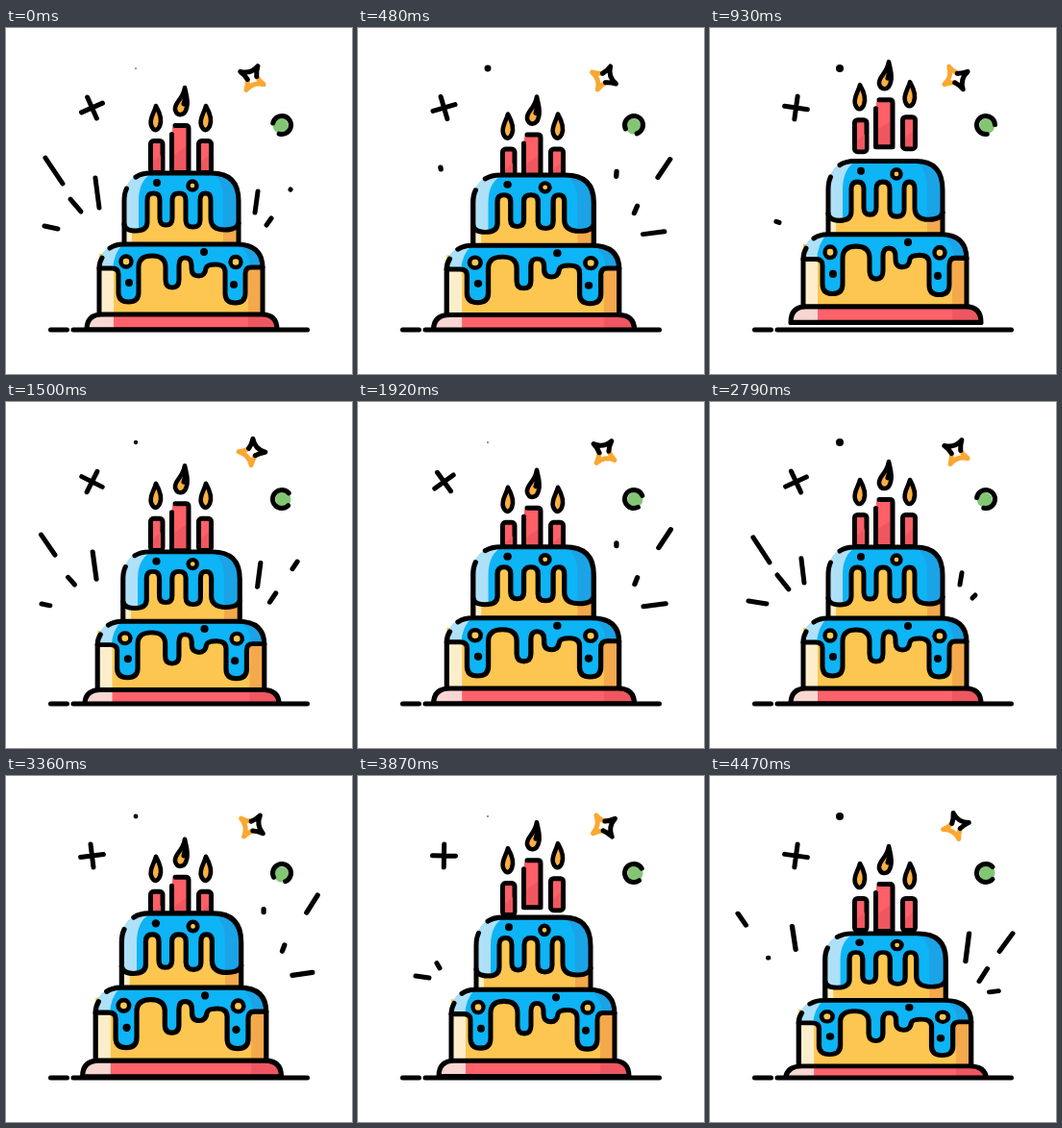
Animation, 360 px wide and 360 px high, one loop 4.5 s. Source, as an HTML page without scripts:

```html
<!DOCTYPE html>
<html lang="en">
<head>
<meta charset="utf-8">
<title>Bouncing birthday cake</title>
<style>
  html, body { margin: 0; width: 100%; height: 100%; overflow: hidden; background: #fff; }
  svg { display: block; width: 100vw; height: 100vh; }
  .line { fill: none; stroke: #000; stroke-width: 5; stroke-linecap: round; stroke-linejoin: round; }
  .candle { fill: #ff5f66; stroke: #000; stroke-width: 5; }
  .flame { fill: #fbb040; stroke: #000; stroke-width: 4.6; stroke-linejoin: round; }
  .bead { fill: #fdc94f; stroke: #000; stroke-width: 4.4; }
  .amber { stroke: #f9a832; }
  .icing { fill: #0db4f6; }
  .sponge { fill: #fdc650; }
  .cream { fill: #fdeecb; }
  .shade { fill: #f3a94c; }
  .glow { fill: #aee0f8; }
  .deep { fill: #1aa3e6; }
</style>
</head>
<body>
<svg viewBox="0 0 360 360">
  <defs>
    <clipPath id="aboveGround"><path d="M0 0H360V314H0Z"/></clipPath>
    <path id="topIcing" d="M123 204V180Q123 151 150 151H214Q242 151 242 180V203Q240 210 228 210 213 210 213 198V179Q213 172 207.500 172 202 172 202 179V200Q202 207 194.500 207 187 207 187 200V179Q187 172 180 172 173 172 173 179V198Q173 205 166.500 205 160 205 160 198V179Q160 172 153.500 172 147 172 147 179V202Q147 211 135 211 124 211 123 204Z"/>
    <path id="lowIcing" d="M97 250Q97 225 122 225H240Q267 225 267 249H255Q249 249 249 256V276Q249 286 238.500 286 228 286 228 276V254Q228 246 218 246 209 246 208 250 207 258 200.500 258 193 258 193 250V247Q193 239 186 239 180 239 180 247V262Q180 270 173 270 166 270 166 262V249Q166 237 152 237 138 237 138 249V275Q138 285 127.500 285 117 285 117 275V256Q117 250 110 250Z"/>
    <path id="base" d="M84 314Q84 298 100 298H266Q282 298 282 314Z"/>
    <path id="flame" d="M156 81C160 88 163 95 160 102 157 108 153 107 151 101 149 94 154 89 156 81Z"/>
    <clipPath id="inTop"><use href="#topIcing"/></clipPath>
    <clipPath id="inLow"><use href="#lowIcing"/></clipPath>
    <clipPath id="inBase"><use href="#base"/></clipPath>
  </defs>

  <!-- master clock: every part restarts with it -->
  <rect width="360" height="360" fill="#fff">
    <animate id="loop" attributeName="visibility" values="visible" begin="0s;loop.end" dur="4.5s"/>
  </rect>

  <!-- floating ornaments -->
  <g transform="translate(89.500 83)"><path class="line" d="M-12 0H12M0-12V12">
    <animateTransform attributeName="transform" type="rotate" values="-24;83;98;91;8;-36;-36;-24" keyTimes="0;.186;.328;.366;.577;.678;.8;1" begin="0s;loop.end" dur="2.834s" repeatCount="indefinite"/>
  </path></g>

  <g transform="translate(256 52)"><g>
    <path class="line amber" d="M-5 0Q-6 5-9.500 10 0 4 9.500 10 6 5 5 0"/>
    <path class="line" d="M-5 0Q-6-5-9.500-10 0-4 9.500-10 6-5 5 0"/>
    <animateTransform attributeName="transform" type="rotate" values="-18;81;105;100;32;-9;-20;-18" keyTimes="0;.186;.328;.366;.577;.678;.85;1" begin="0s;loop.end" dur="2.834s" repeatCount="indefinite"/>
  </g></g>

  <g transform="translate(287 101)"><g>
    <circle cx="1.500" r="8" fill="#82c674"/>
    <path class="line" d="M7-6.400A9.500 9.500 0 1 0 7 6.400"/>
    <animateTransform attributeName="transform" type="rotate" values="150;110;40;12;0;20;146;150" keyTimes="0;.186;.328;.366;.577;.678;.985;1" begin="0s;loop.end" dur="2.834s" repeatCount="indefinite"/>
  </g></g>

  <circle cx="135" cy="42" r=".7">
    <animate attributeName="r" values=".7;4;4;.7" keyTimes="0;.3;.5;1" begin="0s;loop.end" dur="1.93s" repeatCount="indefinite"/>
  </circle>

  <!-- candles -->
  <g>
    <rect class="candle" x="150.500" y="117.500" width="12.500" height="33" rx="3"/>
    <path d="M153 139l8-7v16h-8z" fill="#f0565f"/>
    <use href="#flame" class="flame"/>
    <animateTransform attributeName="transform" type="translate" values="0 0;0 10;0 12;0 8;0 3;0 -26;0 -22;0 -6;0 0;0 0" keyTimes="0;.155;.24;.355;.371;.54;.656;.731;.775;1" begin="0s;loop.end" dur="1.417s" repeatCount="indefinite"/>
  </g>
  <g>
    <rect class="candle" x="200.500" y="117.500" width="13" height="33" rx="3"/>
    <path d="M203 139l8-7v16h-8z" fill="#f0565f"/>
    <use href="#flame" class="flame" x="52"/>
    <animateTransform attributeName="transform" type="translate" values="0 0;0 10;0 12;0 8;0 3;0 -29;0 -25;0 -11;0 0;0 0" keyTimes="0;.155;.24;.355;.371;.54;.656;.731;.79;1" begin="0s;loop.end" dur="1.417s" repeatCount="indefinite"/>
  </g>
  <g>
    <rect x="173" y="101.500" width="17" height="49" rx="3" fill="#ff5f66"/>
    <path d="M175 132l13-9v26h-13z" fill="#f0565f"/>
    <path class="line" d="M176 101.500H187Q190 101.500 190 104.500V150.500H172.500V110.500"/>
    <path class="flame" d="M186 62C188 72 190 76 188 83 186 92 178 92 176 85 175 77 184 75 186 62Z"/>
    <path class="line" d="M186 68Q187 74 185 79"/>
    <animateTransform attributeName="transform" type="translate" values="0 0;0 11;0 13;0 9;0 4;0 -32;0 -27;0 -14;0 0;0 0" keyTimes="0;.155;.24;.355;.371;.54;.656;.731;.8;1" begin="0s;loop.end" dur="1.417s" repeatCount="indefinite"/>
  </g>

  <!-- cake and rays, squashed and stretched from the ground -->
  <g clip-path="url(#aboveGround)"><g transform="translate(182 314)"><g>
    <animateTransform attributeName="transform" type="translate" values="0 0;0 3;0 3;0 0;0 -1;0 -13;0 -7.7;0 -1.500;0 0;0 0" keyTimes="0;.155;.24;.355;.371;.51;.656;.731;.77;1" begin="0s;loop.end" dur="1.417s" repeatCount="indefinite"/>
    <g>
      <animateTransform attributeName="transform" type="scale" values="1 1;1.055 .94;1.06 .93;1.055 1;1.045 1.043;1 1.05;1 1.03;1 1.015;1 1;1 1" keyTimes="0;.155;.24;.355;.371;.51;.656;.731;.77;1" begin="0s;loop.end" dur="1.417s" repeatCount="indefinite"/>
      <g transform="translate(-182 -314)">

        <!-- upper tier -->
        <path class="sponge" d="M123 170H242V226H123Z"/>
        <path class="cream" d="M123 200H131V226H123Z"/>
        <path class="shade" d="M226 200H242V226H226Z"/>
        <use href="#topIcing" class="icing"/>
        <g clip-path="url(#inTop)">
          <path class="glow" d="M120 150H154Q138 157 138 180V214H120Z"/>
          <path class="deep" d="M226 150H246V214H226V176Q226 160 214 150Z"/>
        </g>
        <path class="line" d="M123 204Q124 211 135 211 147 211 147 202V179Q147 172 153.500 172 160 172 160 179V198Q160 205 166.500 205 173 205 173 198V179Q173 172 180 172 187 172 187 179V200Q187 207 194.500 207 202 207 202 200V179Q202 172 207.500 172 213 172 213 179V198Q213 210 228 210 240 210 242 203"/>
        <path class="line" d="M123 223V180Q123 172 125.500 167M135 155Q141 151 150 151H214Q242 151 242 180V223"/>
        <circle cx="157" cy="161" r="4"/>
        <circle class="bead" cx="194" cy="164" r="4.500"/>

        <!-- lower tier -->
        <path class="sponge" d="M97 235H267V298H97Z"/>
        <path class="cream" d="M97 248H112V298H97Z"/>
        <path class="shade" d="M252 246H267V298H252Z"/>
        <use href="#lowIcing" class="icing"/>
        <g clip-path="url(#inLow)">
          <path class="glow" d="M95 223H124Q112 232 111 252H95Z"/>
          <path class="deep" d="M240 223H270V252H254Q254 232 240 225Z"/>
        </g>
        <path class="line" d="M97 250H110Q117 250 117 256V275Q117 285 127.500 285 138 285 138 275V249Q138 237 152 237 166 237 166 249V262Q166 270 173 270 180 270 180 262V247Q180 239 186 239 193 239 193 247V250Q193 258 200.500 258 207 258 208 250 209 246 218 246 228 246 228 254V276Q228 286 238.500 286 249 286 249 276V256Q249 249 255 249H267"/>
        <path class="line" d="M97 297V250Q97 244 100 239M108 229Q114 225 122 225H240Q267 225 267 250V297"/>
        <circle class="bead" cx="125" cy="243" r="5.500"/>
        <circle class="bead" cx="239" cy="243.500" r="5.500"/>
        <circle cx="128" cy="265" r="4"/>
        <circle cx="206" cy="233" r="4"/>
        <circle cx="237" cy="267" r="4"/>

        <!-- base -->
        <use href="#base" fill="#ff626b"/>
        <g clip-path="url(#inBase)">
          <path d="M80 296H112V316H80Z" fill="#f8d6d2"/>
          <path d="M252 296H286V316H252Z" fill="#ee5761"/>
        </g>
        <use href="#base" class="line"/>

        <!-- left rays -->
        <path class="line" d="M59 162 41 135">
          <animate attributeName="d" values="M59 162 41 135;M45 142 37 129;M32 121 32 121;M62 167 62 167;M62 167 62 167;M62 167 45 141;M59 162 41 135" keyTimes="0;.155;.355;.545;.731;.969;1" begin="0s;loop.end" dur="1.417s" repeatCount="indefinite"/>
          <animate attributeName="visibility" values="visible;hidden;visible" keyTimes="0;.33;.735" calcMode="discrete" begin="0s;loop.end" dur="1.417s" repeatCount="indefinite"/>
        </path>
        <path class="line" d="M97 187 93 156">
          <animate attributeName="d" values="M97 187 93 156;M94 169 90.500 143;M91 143 91 143;M98 190 98 190;M98 190 98 190;M98 188 95 163;M97 187 93 156" keyTimes="0;.155;.355;.545;.731;.969;1" begin="0s;loop.end" dur="1.417s" repeatCount="indefinite"/>
          <animate attributeName="visibility" values="visible;hidden;visible" keyTimes="0;.35;.75" calcMode="discrete" begin="0s;loop.end" dur="1.417s" repeatCount="indefinite"/>
        </path>
        <path class="line" d="M78 191 67 178">
          <animate attributeName="d" values="M78 191 67 178;M67 178 67 178;M67 178 67 178;M85 203 85 203;M85 203 85 203;M85 203 82 198;M82 195 70 180;M78 191 67 178" keyTimes="0;.155;.355;.545;.656;.731;.969;1" begin="0s;loop.end" dur="1.417s" repeatCount="indefinite"/>
          <animate attributeName="visibility" values="visible;hidden;visible" keyTimes="0;.21;.66" calcMode="discrete" begin="0s;loop.end" dur="1.417s" repeatCount="indefinite"/>
        </path>
        <path class="line" d="M54 209 40 206">
          <animate attributeName="d" values="M54 209 40 206;M40 207 40 207;M40 207 40 207;M72 213 72 213;M72 213 69 212;M74 213 60 211;M59 210 40 207;M54 209 40 206" keyTimes="0;.155;.355;.545;.656;.731;.969;1" begin="0s;loop.end" dur="1.417s" repeatCount="indefinite"/>
          <animate attributeName="visibility" values="visible;hidden;visible" keyTimes="0;.153;.63" calcMode="discrete" begin="0s;loop.end" dur="1.417s" repeatCount="indefinite"/>
        </path>

        <!-- right rays -->
        <path class="line" d="M259 192 262 170">
          <animate attributeName="d" values="M259 192 262 170;M261.500 182 265 151;M264.400 150 264.400 147;M264.400 147 264.400 147;M260 192 260 192;M260 190 262 178;M259 192 262 170" keyTimes="0;.155;.355;.545;.731;.969;1" begin="0s;loop.end" dur="1.417s" repeatCount="indefinite"/>
          <animate attributeName="visibility" values="visible;hidden;visible" keyTimes="0;.39;.92" calcMode="discrete" begin="0s;loop.end" dur="1.417s" repeatCount="indefinite"/>
        </path>
        <path class="line" d="M296 168 296 168">
          <animate attributeName="d" values="M296 168 296 168;M295 171 308 151;M306 152 318 133;M319 132 319 132;M295 170 295 170;M295 169 295 169;M296 168 296 168" keyTimes="0;.155;.355;.545;.731;.969;1" begin="0s;loop.end" dur="1.417s" repeatCount="indefinite"/>
          <animate attributeName="visibility" values="visible;hidden;visible" keyTimes="0;.53;.98" calcMode="discrete" begin="0s;loop.end" dur="1.417s" repeatCount="indefinite"/>
        </path>
        <path class="line" d="M271 205 276 198">
          <animate attributeName="d" values="M271 205 276 198;M275 204 283 190;M282.400 190 285 183;M286 181 286 181;M273 204 273 204;M273 204 276 201;M271 205 276 198" keyTimes="0;.155;.355;.47;.731;.969;1" begin="0s;loop.end" dur="1.417s" repeatCount="indefinite"/>
          <animate attributeName="visibility" values="visible;hidden;visible" keyTimes="0;.46;.94" calcMode="discrete" begin="0s;loop.end" dur="1.417s" repeatCount="indefinite"/>
        </path>
        <path class="line" d="M285 216 285 216">
          <animate attributeName="d" values="M285 216 285 216;M285 216 294 214.600;M291 213 313 210;M313 210 313 210;M285 216 285 216;M285 216 285 216" keyTimes="0;.155;.355;.545;.731;1" begin="0s;loop.end" dur="1.417s" repeatCount="indefinite"/>
          <animate attributeName="visibility" values="hidden;visible;hidden" keyTimes="0;.07;.545" calcMode="discrete" begin="0s;loop.end" dur="1.417s" repeatCount="indefinite"/>
        </path>
      </g>
    </g>
  </g></g></g>

  <path class="line" d="M46.500 314H63.500M70 314H313.500"/>
</svg>
</body>
</html>
```
